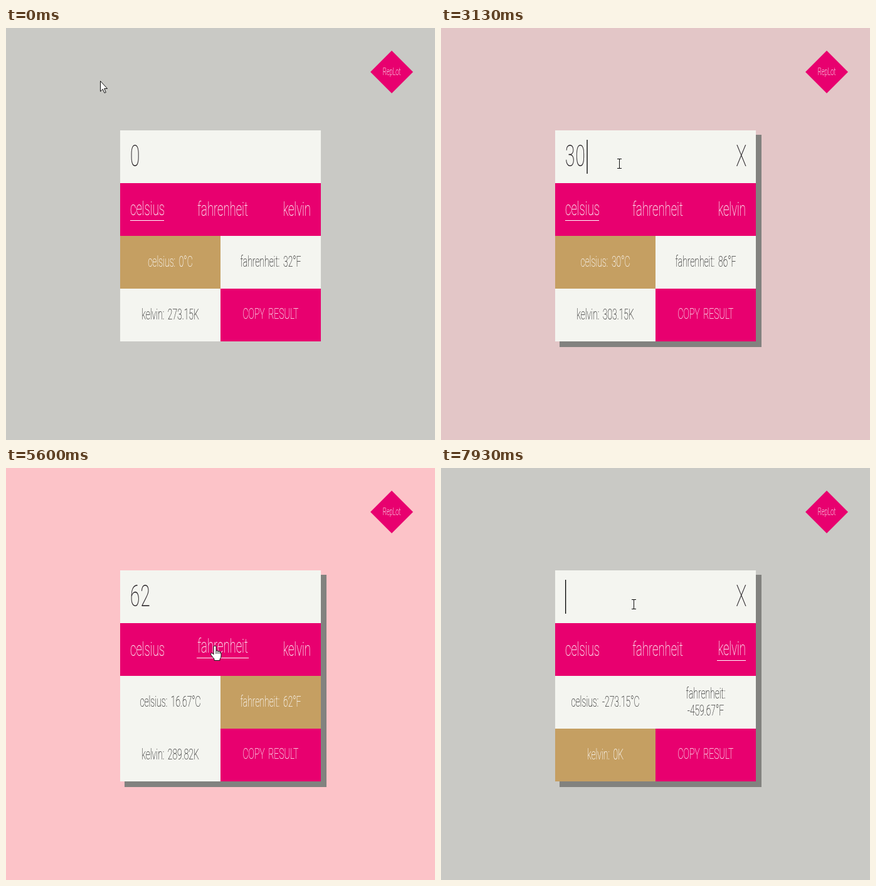
An HTML page that plays this animation: 684x656 px, repeating every 8000 ms.

```html
<!DOCTYPE html>
<html lang="en">
<head>
<meta charset="utf-8">
<title>Temperature converter</title>
<style>
  html, body { margin: 0; width: 100%; height: 100%; overflow: hidden; }
  svg { display: block; width: 684px; height: 656px; }
  text { font-family: Roboto, Lato, sans-serif; font-weight: 200; stroke: currentColor; stroke-width: .2; fill: currentColor; }
  .cell { word-spacing: .17em; }
  .input { letter-spacing: .05em; }
  .cursor { fill: #fff; stroke: #111; stroke-width: 1; }
</style>
</head>
<body>
<svg id="stage" viewBox="0 0 684 656"></svg>
<script>
const LOOP = 8000, PINK = '#e8006f', PAPER = '#f4f5f0', TAN = '#c59f62', INK = '#181318', WHITE = '#fff';
const COLD = [201, 201, 197], HOT = [252, 195, 200];
const CONDENSE = 0.58;

// Moments of the user's actions, in ms
const FOCUS = 1000, FIRST_KEY = 1600, REPEAT = 2040, PICK_F = 5530, PICK_K = 6700, CLEAR = 7750;
const KEY_RATE = 0.027, TOP = 62, REPEAT_END = REPEAT + (TOP - 1) / KEY_RATE;

// Pointer stops: time, x, y
const STOPS = [
  [300, 150, 84], [900, 284, 216], [4850, 284, 216], [5350, 333, 284],
  [5800, 333, 284], [6350, 462, 288], [6850, 462, 288], [7400, 307, 217]
];
const TABS = [
  { name: 'celsius', x: 198, w: 54, anchor: 'start' },
  { name: 'fahrenheit', x: 304, w: 83, anchor: 'middle' },
  { name: 'kelvin', x: 440, w: 46, anchor: 'end' }
];
const CARD = [182, 163, 320, 336], INPUT = [182, 163, 320, 84];
const CELLS = [[182, 331], [342, 331], [182, 415]];
const UNITS = ['°C', '°F', 'K'];
const CURSORS = {
  arrow: 'M.5 .5V17L4.3 13.4L7 19.4L9.3 18.4L6.7 12.5H11.6Z',
  beam: 'M-3 -7.5H4M-3 7.5H4M.5 -7.5V7.5',
  hand: 'M-2 13V1Q-2 -1 0 -1T2 1V7Q4.5 5.5 5 8Q7.5 6.5 8 9Q10 8.5 10 11V15Q10 19 8 20V22.5H-1V20L-6 14Q-7.5 11 -5 10.5Q-4 10.5 -2 13ZM2 7V12M5 8V12M8 9V12'
};

const rect = (x, y, w, h, fill) => `<rect x="${x}" y="${y}" width="${w}" height="${h}" fill="${fill}"/>`;
const label = (s, x, y, size, color, anchor = 'middle', cls = '') =>
  `<text class="${cls}" transform="translate(${x} ${y}) scale(${CONDENSE} 1)" font-size="${size}" text-anchor="${anchor}" color="${color}">${s}</text>`;

function pointer(t) {
  if (t <= STOPS[0][0]) return STOPS[0].slice(1);
  const i = STOPS.findIndex(s => s[0] > t);
  if (i < 0) return STOPS[STOPS.length - 1].slice(1);
  const [t0, x0, y0] = STOPS[i - 1], [t1, x1, y1] = STOPS[i];
  const p = (t - t0) / (t1 - t0), e = p * p * (3 - 2 * p);
  return [x0 + (x1 - x0) * e, y0 + (y1 - y0) * e];
}

function over(t, [x, y, w, h]) {
  const [px, py] = pointer(t);
  return px >= x && px < x + w && py >= y && py < y + h;
}
const tabBox = tab => [tab.x, 270, tab.w, 38];

// Share of the last 160 ms spent over a box: a hover transition
function hover(t, box) {
  let sum = 0;
  for (let k = 0; k < 16; k++) sum += over(t - k * 10, box);
  return sum / 16;
}

function typed(t) {
  if (t < FOCUS) return '0';
  if (t < FIRST_KEY || t >= CLEAR) return '';
  return String(Math.min(TOP, 1 + Math.floor(Math.max(0, t - REPEAT) * KEY_RATE)));
}

function caretOn(t) {
  if (t < FOCUS || (t >= PICK_F && t < CLEAR)) return false;
  if (t >= REPEAT && t < REPEAT_END) return true;
  const since = [CLEAR, REPEAT_END, FIRST_KEY, FOCUS].find(m => t >= m);
  return Math.floor((t - since) / 500) % 2 === 0;
}

function convert(v, unit) {
  const c = [v, (v - 32) / 1.8, v - 273.15][unit];
  const all = [c, c * 1.8 + 32, c + 273.15];
  all[unit] = v;
  return all.map((n, i) => {
    const r = Math.round(n * 100) / 100;
    return (Number.isInteger(r) ? r : r.toFixed(2)) + UNITS[i];
  });
}

function drawCell(i, value, active) {
  const [x, y] = CELLS[i], color = active ? WHITE : '#333', name = TABS[i].name + ':';
  const put = (s, dy) => label(s, x + 80, y + dy, 24, color, 'middle', 'cell');
  const line = name + ' ' + value;
  return rect(x, y, 160, 84, active ? TAN : PAPER) +
    (line.length > 19 ? put(name, 36) + put(value, 63) : put(line, 49));
}

function drawTab(tab, active, t) {
  const up = 4 * hover(t, tabBox(tab));
  const x = tab.x + { start: 0, middle: tab.w / 2, end: tab.w }[tab.anchor];
  return label(tab.name, x, (active ? 298 : 299) - up, 32, WHITE, tab.anchor) +
    (active ? rect(tab.x, 306 - up, tab.w, 1, WHITE) : '');
}

function drawCursor(t) {
  const kind = over(t, INPUT) ? 'beam' : TABS.some(tab => over(t, tabBox(tab))) ? 'hand' : 'arrow';
  const [x, y] = pointer(t).map(Math.round);
  return `<path class="cursor" transform="translate(${x} ${y})" d="${CURSORS[kind]}"/>`;
}

function draw(t) {
  const text = typed(t), value = Number(text);
  const unit = t < PICK_F ? 0 : t < PICK_K ? 1 : 2;
  const heat = Math.min(1, value / 58);
  const back = `rgb(${COLD.map((c, i) => Math.round(c + (HOT[i] - c) * heat))})`;
  const lift = hover(t, CARD);
  const results = convert(value, unit);
  const [x, y, w, h] = CARD;

  return rect(0, 0, 684, 656, back) +
    `<path d="M615 36L649 70L615 104L581 70Z" fill="${PINK}"/>` +
    label('RepLot', 615, 75, 16, WHITE) +
    (lift ? rect(x + 7 * lift, y + 7 * lift, w + 2 * lift, h + 2 * lift, '#82827f') : '') +
    rect(...INPUT, PAPER) +
    label(text, 198, 220, 48, INK, 'start', 'input') +
    (caretOn(t) ? rect(198 + 17.2 * text.length, 178, 1.3, 54, '#000') : '') +
    (over(t, INPUT) ? label('X', 487, 220, 48, INK, 'end') : '') +
    rect(182, 247, 320, 84, PINK) +
    TABS.map((tab, i) => drawTab(tab, i === unit, t)).join('') +
    results.map((r, i) => drawCell(i, r, i === unit)).join('') +
    rect(342, 415, 160, 84, PINK) +
    label('COPY RESULT', 422, 463, 24, WHITE, 'middle', 'cell') +
    drawCursor(t);
}

const stage = document.getElementById('stage'), start = performance.now();
function frame() {
  stage.innerHTML = draw((performance.now() - start) % LOOP);
  requestAnimationFrame(frame);
}
frame();
</script>
</body>
</html>
```
